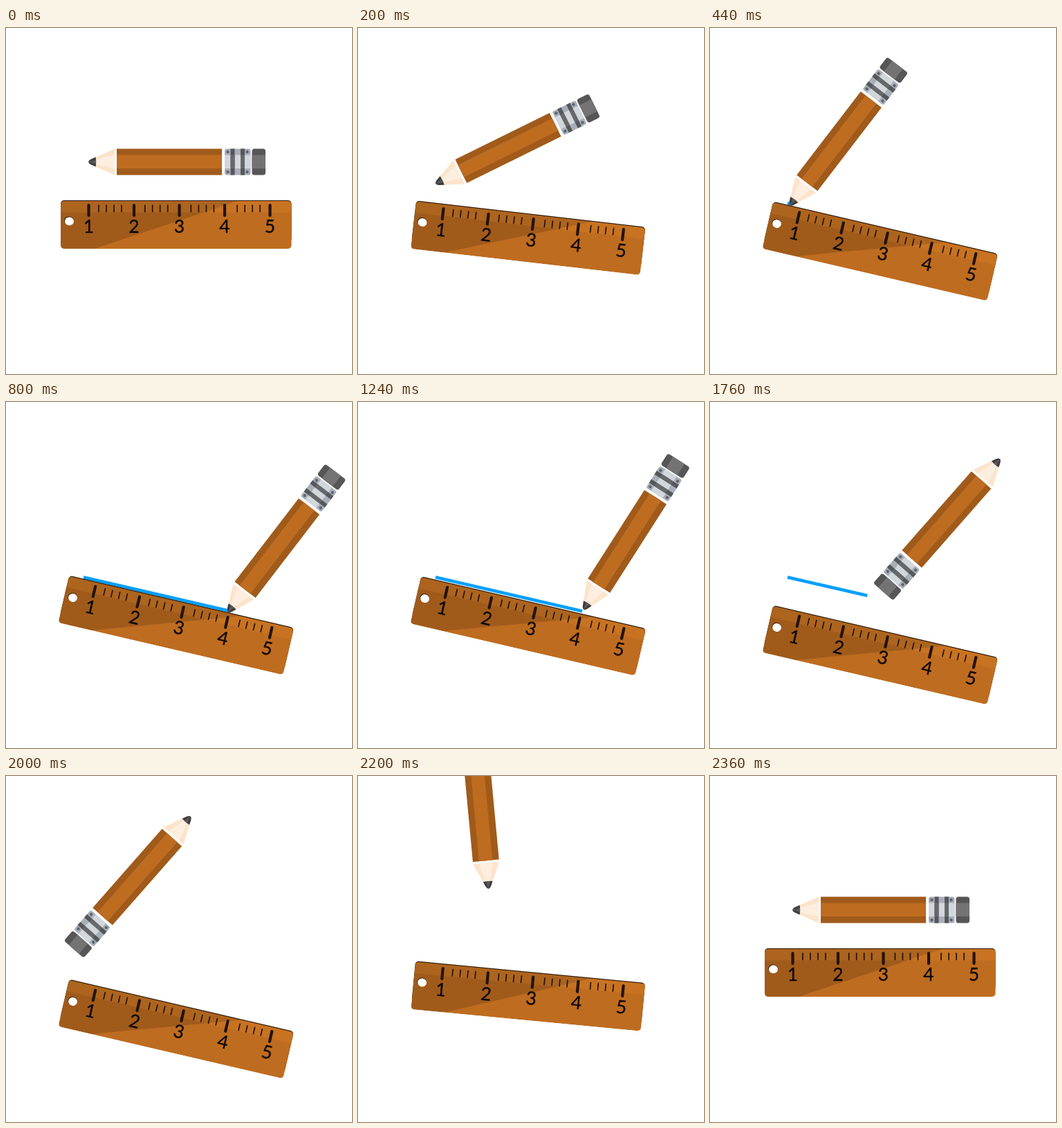
Animation of 500 by 500 pixels, one loop 3600 ms. Source, as an HTML page:

```html
<!DOCTYPE html>
<html lang="en">
<head>
<meta charset="utf-8">
<title>Pencil and ruler</title>
<style>
  html, body { margin: 0; height: 100%; overflow: hidden; background: #fff; }
  svg { display: block; width: 100vw; height: 100vh; }
  text { font: 26.5px Lato, "Open Sans", sans-serif; text-anchor: middle; fill: #0d0602; }
</style>
</head>
<body>
<svg viewBox="0 0 500 500">
  <defs>
    <clipPath id="rulerClip"><rect x="79" y="250" width="333.5" height="69" rx="5"/></clipPath>
    <clipPath id="metalClip"><rect x="316" y="174.5" width="37.5" height="38" rx="3"/></clipPath>
    <clipPath id="eraserClip"><rect x="355.5" y="174.5" width="19.5" height="38" rx="3.5"/></clipPath>
    <clipPath id="coneClip"><path d="M157 174.5L123 189.5Q115.5 193.5 123 197.500L157 212.5Z"/></clipPath>
  </defs>

  <path id="line" stroke="#009fff" stroke-width="4.6"/>

  <g id="ruler">
    <rect x="79" y="249" width="333.5" height="60" rx="5" fill="#2b1707"/>
    <g clip-path="url(#rulerClip)">
      <path d="M79 250H413V319H79Z" fill="#be6c20"/>
      <path d="M79 250H335L128 319H79Z" opacity=".155"/>
      <path d="M79 250H413V266.5H79Z" fill="#ffa030" opacity=".13"/>
    </g>
    <ellipse cx="91" cy="278.5" rx="6.9" ry="6.3" fill="#3a1f0a"/>
    <ellipse cx="91.5" cy="279.2" rx="6.5" ry="6" fill="#fff"/>
    <g id="marks" stroke="#24130a" stroke-linecap="round"></g>
  </g>

  <g id="pencil">
    <g clip-path="url(#coneClip)">
      <path d="M115 174H157V213H115Z" fill="#fce4cb"/>
      <path d="M119 193.5L157 183V203.5Z" fill="#fdeee0"/>
      <path d="M115 180H128Q132.5 193.5 128 207H115Z" fill="#3d3d40"/>
      <path d="M119 193.5L130 190.5V196.5Z" fill="#58585b"/>
    </g>
    <path d="M160 174.5H312V212.5H160Z" fill="#a05b1b"/>
    <path d="M160 183.5H312V203H160Z" fill="#be6c20"/>
    <g clip-path="url(#metalClip)">
      <path d="M316 174H354V213H316Z" fill="#a9afb8"/>
      <path d="M316 183.5H354V203H316Z" fill="#d2d7dc"/>
      <path d="M327.5 174V213M342 174V213" stroke="#55575b" stroke-width="6"/>
      <path d="M327.5 183.5V203M342 183.5V203" stroke="#66686c" stroke-width="6"/>
      <path d="M320.5 179h0m28 0h0m0 29h0m-28 0h0"
            stroke="#5d6672" stroke-width="4.4" stroke-linecap="round"/>
    </g>
    <g clip-path="url(#eraserClip)">
      <path d="M355 174H376V213H355Z" fill="#565656"/>
      <path d="M355 183.5H376V203H355Z" fill="#737373"/>
    </g>
  </g>
</svg>
<script>
const LOOP = 3600, STEP = 40;
const $ = id => document.getElementById(id);

function ease(t, from, to) {
  const p = Math.min(1, Math.max(0, (t - from) / (to - from)));
  return p * p * (3 - 2 * p);
}

// Shift by (dx, dy) and turn about the pivot (x, y)
function place(id, x, y, dx, dy, angle) {
  $(id).setAttribute("transform",
    `translate(${dx} ${dy}) rotate(${angle} ${x} ${y})`);
}

function drawMarks() {
  const mark = (x, end, width) =>
    `<path d="M${x} 256V${end}" stroke-width="${width}"/>`;
  let out = "";
  for (let n = 0; n < 5; n++) {
    const x = 119.5 + 65.5 * n;
    out += mark(x, 271, 4.2) +
      `<text x="${x}" y="296" stroke-width=".4">${n + 1}</text>`;
    for (let i = 0; i < 4 && n < 4; i++)
      out += mark(x + 14.5 + 1.2 * n + 11 * i, 265.5, 1.7);
  }
  $("marks").innerHTML = out;
}

function draw(now) {
  const t = Math.floor(now % LOOP / STEP) * STEP;
  const lift = ease(t, 0, 400);
  const write = ease(t, 400, 780);
  const flip = ease(t, 1200, 1600);
  const rub = ease(t, 1600, 2000);
  const away = 1 - ease(t, 2000, 2360);
  const bend = 2 * rub * (1 - rub);

  place("pencil", 139, 193.5,
    away * (-18 * lift + 211.7 * write + 146 * flip - 225 * rub + 14 * bend),
    away * (45.6 * lift + 49 * write - 174 * flip - 41 * rub - 6 * bend),
    away * (-52.5 * lift - 176.2 * flip));
  place("ruler", 245.7, 284,
    0, away * (38.5 * lift + 43 * flip), away * 13.1 * lift);

  const drawn = write - ease(t, 1600, 1940);
  $("line").setAttribute("d", drawn > 0 ? `M112 253.2l${212 * drawn} ${49 * drawn}` : "");
}

drawMarks();
const start = performance.now();
draw(0);
requestAnimationFrame(function tick() {
  draw(performance.now() - start);
  requestAnimationFrame(tick);
});
</script>
</body>
</html>
```
